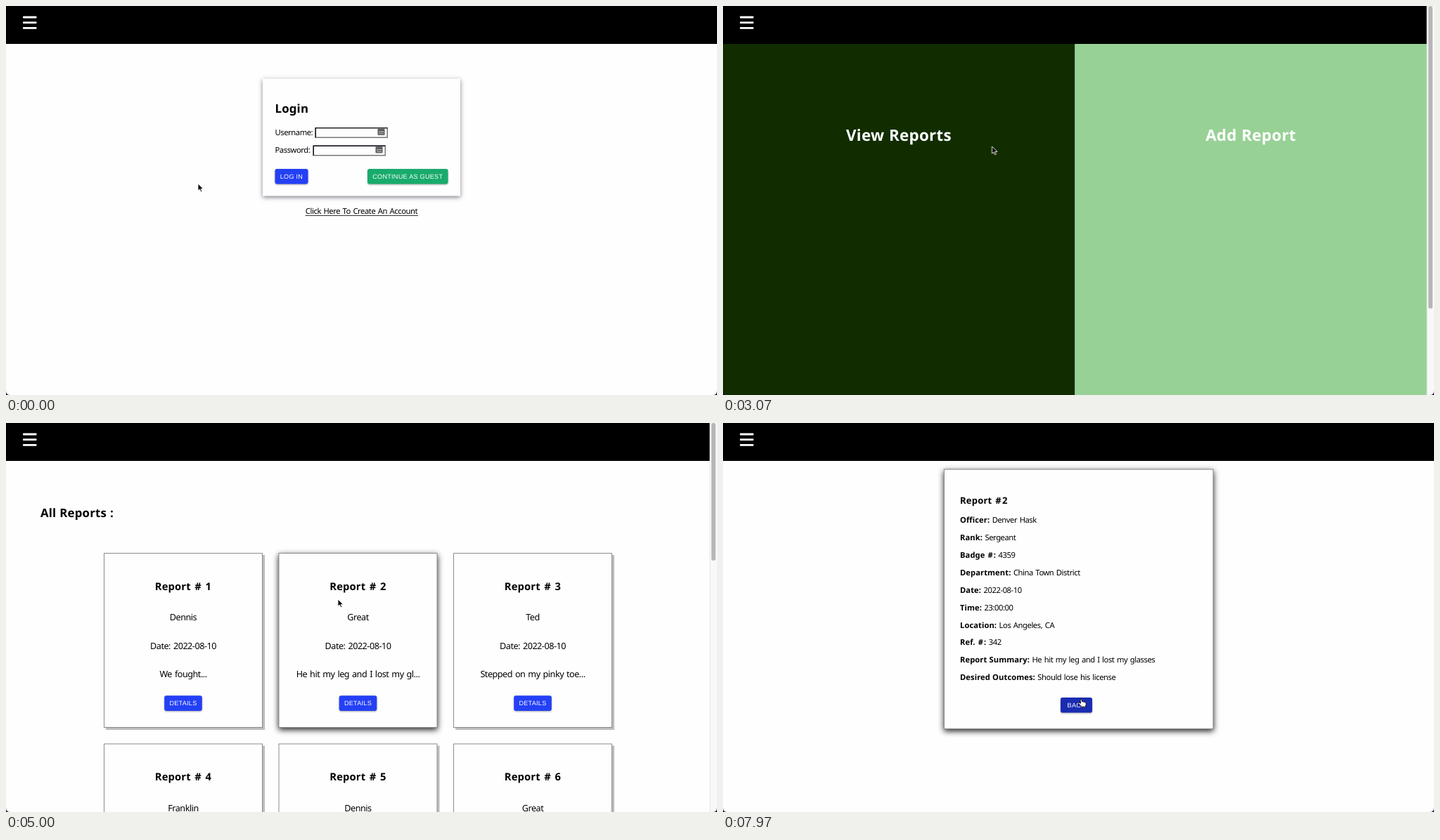
Recreate the animation shown at these times as an HTML page. Size 1011 px wide and 554 px high, loop 8000 ms.

```html
<!DOCTYPE html>
<html lang="en">
<head>
<meta charset="utf-8">
<title>Reports</title>
<style>
html, body { margin: 0; width: 100%; height: 100%; overflow: hidden; background: #fefefe; }
svg { display: block; width: 1011px; height: 554px; }
text {
  font: 11.2px "Noto Sans", "Open Sans", sans-serif;
  letter-spacing: -.0375em; word-spacing: .09em; white-space: pre;
  text-rendering: geometricPrecision;
}
.b { font-weight: 700; letter-spacing: .012em; word-spacing: .02em; }
.mid { text-anchor: middle; }
.cap {
  font: 9.1px "Liberation Sans", Arial, sans-serif;
  letter-spacing: .02857em; word-spacing: 0; fill: #fff;
}
.box { fill: #fefefe; stroke: #8b8b8b; filter: drop-shadow(3.5px 3.5px 0 #bdbdbd); }
.panel { fill: #fefefe; filter: drop-shadow(0 2px 3px rgba(25, 25, 50, .55)); }
.btn { filter: drop-shadow(0 1.2px 1px rgba(0, 0, 0, .35)); }
.blue { fill: #2440f5; }
.green { fill: #19ab6c; }

.page, .anim, .tip { animation: 8s infinite; }
.page, .tip, .swap { animation-timing-function: step-end; }
#login { animation-name: login; }
#home { animation-name: home; }
#list { animation-name: list; }
#detail { animation-name: detail; }
#hand { animation-name: hand; }
#arrow { animation-name: arrow; }
#stale { animation-name: stale; }
#fresh { animation-name: fresh; }
#cursor { animation-name: move; }
#guest { animation-name: guest; }
#card1 { animation-name: lift1; }
#card2 { animation-name: lift2; }
#sheet { animation-name: lift3; }
#open { animation-name: open; }
#back { animation-name: back; }

@keyframes login { 0% { visibility: visible } 24.125%, 100% { visibility: hidden } }
@keyframes home { 0% { visibility: hidden } 24.125% { visibility: visible } 47.875%, 100% { visibility: hidden } }
@keyframes list { 0% { visibility: hidden } 47.875% { visibility: visible } 79.125%, 100% { visibility: hidden } }
@keyframes detail { 0% { visibility: hidden } 79.125%, 100% { visibility: visible } }
@keyframes stale { 0%, 100% { opacity: 1 } 80.8% { opacity: 0 } }
@keyframes fresh { 0% { opacity: 0 } 80.8%, 100% { opacity: 1 } }
@keyframes hand {
  0% { opacity: 0 } 21.1% { opacity: 1 } 24.5% { opacity: 0 } 41.3% { opacity: 1 }
  48.5% { opacity: 0 } 71.8%, 100% { opacity: 1 }
}
@keyframes arrow {
  0% { opacity: 1 } 21.1% { opacity: 0 } 24.5% { opacity: 1 } 41.3% { opacity: 0 }
  48.5% { opacity: 1 } 71.8%, 100% { opacity: 0 }
}
@keyframes move {
  0%, 2% { transform: translate(273px, 253px); animation-timing-function: ease-in-out }
  20.6%, 34.25% { transform: translate(576px, 237px); animation-timing-function: ease-in }
  38.375% { transform: translate(383px, 200px); animation-timing-function: ease-out }
  44.5%, 50% { transform: translate(246px, 187px); animation-timing-function: ease-in-out }
  62% { transform: translate(472px, 251px) }
  63% { transform: translate(472px, 251px); animation-timing-function: ease-in-out }
  73.5% { transform: translate(505px, 396px) }
  79.125%, 84% { transform: translate(507px, 397px) }
  96%, 100% { transform: translate(509px, 393px) }
}
@keyframes guest { 0%, 21% { fill: #19ab6c } 24%, 100% { fill: #12794c } }
@keyframes open { 0%, 71.8% { fill: #2440f5 } 74.9%, 100% { fill: #1a2cb2 } }
@keyframes back { 0%, 79.5% { fill: #2440f5 } 82.6%, 100% { fill: #1a2cb2 } }
@keyframes lift1 {
  0%, 51%, 60.5%, 100% { filter: drop-shadow(3.5px 3.5px 0 #bdbdbd) }
  54%, 56.8% { filter: drop-shadow(0 3.5px 4px rgba(0, 0, 0, .85)) }
}
@keyframes lift2 {
  0%, 57.5% { filter: drop-shadow(3.5px 3.5px 0 #bdbdbd) }
  61.2%, 100% { filter: drop-shadow(0 3.5px 4px rgba(0, 0, 0, .85)) }
}
@keyframes lift3 {
  0%, 79.5% { filter: drop-shadow(3.5px 3.5px 0 #bdbdbd) }
  83.2%, 100% { filter: drop-shadow(0 3.5px 4px rgba(0, 0, 0, .85)) }
}
</style>
</head>
<body>
<svg id="stage" viewBox="0 0 1011 554"></svg>
<script>
const rect = (x, y, w, h, attrs = '') =>
  `<rect x="${x}" y="${y}" width="${w}" height="${h}" ${attrs}/>`;

const text = (x, y, str, cls = '', size = 11.2) =>
  `<text x="${x}" y="${y}" class="${cls}" style="font-size:${size}px">${str}</text>`;

// The bold hash gets side room of its own.
const hash = '<tspan dx=".086em">#</tspan><tspan dx=".086em">';
const heading = (x, y, tail, cls, size) =>
  text(x, y, `Report ${hash}${tail}</tspan>`, 'b ' + cls, size);

const button = (x, y, w, h, label, color, id = '') =>
  rect(x, y, w, h, `rx="2.8" class="btn ${color} ${id && 'anim'}" ${id && `id="${id}"`}`) +
  `<text x="${x + w / 2}" y="${y + h / 2 + 3.1}" class="cap mid">${label}</text>`;

const scrollbar = len =>
  rect(1001, 0, 10, 554, 'fill="#f8f8f8"') + rect(1000.5, 0, 1, 554, 'fill="#e6e6e6"') +
  rect(1003, 0, 6, len, 'rx="3" fill="#b7b7b7"');

const header = w => rect(0, 0, w, 54) +
  [14.5, 22.2, 29.9].map(y => rect(24, y, 19.5, 2.9, 'rx=".8" fill="#fff"')).join('');

function field(x, y, iconX) {
  const w = 103.5, h = 15;
  let dots = '';
  for (let i = 0; i < 3; i++) dots += rect(iconX + 2 + i * 2.4, y + 5.4, 1.3, 1.6, 'fill="#eee"');
  return rect(x, y, w, h, 'fill="#777"') +
    `<path d="M${x} ${y + h}V${y}H${x + w}l-1.5 1.5H${x + 1.5}V${y + h - 1.5}z" fill="#151520"/>` +
    rect(x + 1.5, y + 1.5, w - 3, h - 3, 'fill="#fefefe"') +
    rect(iconX, y + 1.7, 10, 9.4, 'rx="1" fill="#5c5c5c"') + dots +
    rect(iconX + 1.5, y + 8.5, 7, 1, 'fill="#bbb"');
}

function card(i, name, note) {
  const x = 139.5 + (i % 3) * 248.5, y = 185.5 + Math.floor(i / 3) * 271.5, c = x + 112.5;
  const live = i < 2 ? `id="card${i + 1}" class="box anim"` : 'class="box"';
  return rect(x, y, 225, 248, live) +
    heading(c, y + 52.4, ' ' + (i + 1), 'mid', 14.74) +
    text(c, y + 95.8, name, 'mid', 12.6) +
    text(c, y + 136.2, 'Date: 2022-08-10', 'mid', 12.6) +
    text(c, y + 176.5, note, 'mid', 12.6) +
    button(c - 26.8, y + 202.8, 53.6, 21.6, 'DETAILS', 'blue', i === 1 ? 'open' : '');
}

const page = (id, body) => `<g id="${id}" class="page">${body}</g>`;

const login = header(1011) +
  rect(365, 103.5, 281, 167, 'class="panel"') +
  text(382.5, 151.8, 'Login', 'b', 16.8) +
  text(382.5, 183.5, 'Username:') + field(439.5, 173, 528.5) +
  text(382.5, 209, 'Password:') + field(436.5, 198.5, 525.5) +
  button(382.5, 232, 47, 21.4, 'LOG IN', 'blue') +
  button(514, 232, 114.5, 21.4, 'CONTINUE AS GUEST', 'green', 'guest') +
  text(505.5, 296, 'Click Here To Create An Account', 'mid') +
  rect(425.5, 298, 160.5, 1, 'fill="#333"');

const home = rect(0, 54, 500.5, 500, 'fill="#112d00"') +
  rect(500.5, 54, 500.5, 500, 'fill="#98d196"') + header(1001) +
  `<g fill="#fff">${text(250, 191.8, 'View Reports', 'b mid', 22.4)}` +
  `${text(750.5, 191.8, 'Add Report', 'b mid', 22.4)}</g>` + scrollbar(431);

const cards = [
  ['Dennis', 'We fought...'],
  ['Great', 'He hit my leg and I lost my gl...'],
  ['Ted', 'Stepped on my pinky toe...'],
  ['Franklin', ''], ['Dennis', ''], ['Great', '']
];
const list = header(1001) + text(49, 134, 'All Reports :', 'b', 16.8) +
  cards.map(([name, note], i) => card(i, name, note)).join('') + scrollbar(196);

const rows = [
  ['Officer:', 'Denver Hask'], ['Rank:', 'Sergeant'],
  [`Badge ${hash}:</tspan>`, '4359'], ['Department:', 'China Town District'],
  ['Date:', '2022-08-10'], ['Time:', '23:00:00'], ['Location:', 'Los Angeles, CA'],
  [`Ref. ${hash}:</tspan>`, '342'],
  ['Report Summary:', 'He hit my leg and I lost my glasses'],
  ['Desired Outcomes:', 'Should lose his license']
];
const detail = header(1011) +
  rect(314.5, 66, 382.5, 369.5, 'id="sheet" class="box anim"') +
  `<g id="stale" class="anim swap">${heading(337, 114.7, '6', '', 13.1)}</g>` +
  `<g id="fresh" class="anim swap">${heading(337, 114.7, '2', '', 13.1)}</g>` +
  rows.map(([label, value], i) => text(337, 142 + i * 24.92,
    `<tspan class="b" style="letter-spacing:.006em">${label}</tspan> ${value}`)).join('') +
  button(480, 391, 45, 21.6, 'BACK', 'blue', 'back');

const cursor = `<g id="cursor" class="anim">
  <path id="arrow" class="tip" d="M0 0V10.2L2.4 8L4.1 11.8L5.8 11.1L4.2 7.4H7.4Z"
    fill="#000" stroke="#fff" stroke-width=".9" stroke-linejoin="round"/>
  <path id="hand" class="tip" d="M-1 1Q0-.6 1 1L1.8 4Q3 3.2 3.6 4.3Q5 3.6 5.5 4.9Q7.2 4.5 7.3 6.2
    Q7.6 8.4 6.6 9.6V11.2H.8Q-.2 9.4-2.3 7.7Q-4 6.2-2.8 5.5Q-1.8 5.1-.3 6.3Z"
    fill="#fff" stroke="#000" stroke-width=".9" stroke-linejoin="round"/>
</g>`;

const corners = '<path d="M0 548Q0 554 6 554H0zM1011 548Q1011 554 1005 554H1011z" fill="#17143a"/>';

document.getElementById('stage').innerHTML =
  page('login', login) + page('home', home) + page('list', list) +
  page('detail', detail) + corners + cursor;
</script>
</body>
</html>
```
